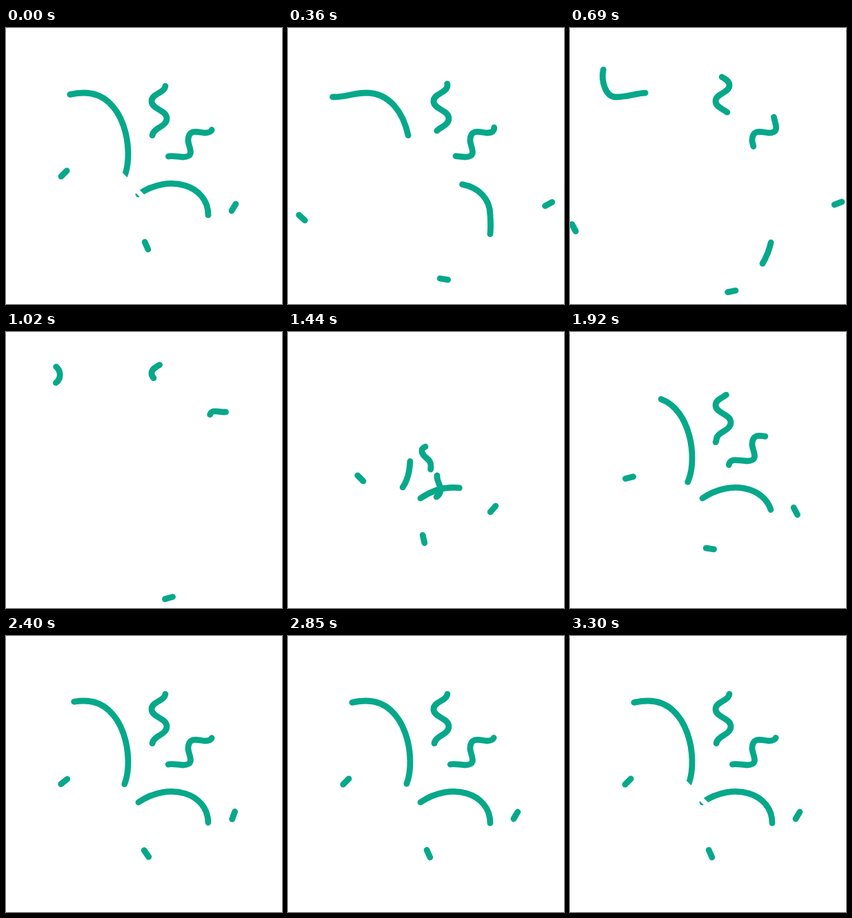
An HTML page with a canvas that plays this animation: 400x400 px, repeating every 5330 ms.

```html
<!DOCTYPE html>
<html lang="en">
<head>
<meta charset="utf-8">
<title>Confetti</title>
<style>
html, body { margin: 0; width: 100%; height: 100%; overflow: hidden; background: #fff; }
canvas { display: block; width: 400px; height: 400px; }
</style>
</head>
<body>
<canvas id="stage" width="400" height="400"></canvas>
<script>
const ctx = document.getElementById('stage').getContext('2d');
const LOOP = 5330, STEP = 30, BURST = 1110, CUT = 3270;

const clamp = v => Math.min(1, Math.max(0, v));
const mix = (a, b, u) => a + (b - a) * u;
const easeIn = (t, dur, pow) => clamp(t / dur) ** pow;
const easeOut = (t, dur, pow) => 1 - (1 - clamp(t / dur)) ** pow;

// Wavy path climbing through turning points [x, y] with upright tangents
function weave(turns) {
  return turns.slice(1).map(([x, y], i) => {
    const [px, py] = turns[i], mid = (py + y) / 2;
    return `C${px} ${mid} ${x} ${mid} ${x} ${y}`;
  }).join('');
}

// A ribbon slides along the path d and rests between two points on it.
// enter: start, duration, power; leave: duration, power
function ribbon(d, restTail, restHead, enter, leave) {
  const path = document.createElementNS('http://www.w3.org/2000/svg', 'path');
  path.setAttribute('d', d);
  const len = path.getTotalLength();
  const nearest = ([x, y]) => {
    let best = 0, min = Infinity;
    for (let s = 0; s <= len; s += 0.5) {
      const p = path.getPointAtLength(s), gap = Math.hypot(p.x - x, p.y - y);
      if (gap < min) { min = gap; best = s; }
    }
    return best;
  };
  return { shape: new Path2D(d), len, tail: nearest(restTail), head: nearest(restHead), enter, leave };
}

const ribbons = [
  ribbon('M164 228Q169 222 172 214C186 178 172 94 113 94C95 94 85 100 66 100' +
    'C44 100 40 46 62 46C76 46 86 66 70 75Q60 81 50 82',
    [172, 214], [93, 97], [1325, 1915, 4.2], [1140, 1.5]),
  ribbon('M192 241C237 210 293 228 293 271C296 310 288 332 265 362',
    [192, 241], [293, 271], [1200, 1680, 4], [840, 1.5]),
  ribbon('M186 229C202 222 207 208 207 193' + weave([[207, 193], [194, 172], [212, 157],
    [233, 131], [211, 106], [231, 83], [211, 60], [233, 36]]),
    [213, 156], [231, 85], [1304, 1136, 4], [1140, 2.65]),
  ribbon('M184 232C190 244 221 247 221 228C221 222 216 217 216 209C216 199 230 206 230 196' +
    'C230 180 245 187 256 187C276 187 264 172 264 163C264 144 281 152 288 152' +
    'C307 152 295 136 295 125C295 110 306 116 316 116S330 114 332 108',
    [235, 187], [297, 148], [1305, 1345, 4], [1140, 2.65])
];

// Chips: launch point, rest pose, exit shift and turn, exit duration, entry spin
const chips = [
  { from: [182, 216], rest: [84, 211], deg: -45, shift: [-79, 79], turn: 108, dur: 850, spin: -154 },
  { from: [176, 244], rest: [330, 260], deg: 121, shift: [59, -6], turn: 38, dur: 850, spin: 292 },
  { from: [171, 243], rest: [203.5, 315.5], deg: 66, shift: [32.5, 70], turn: -82, dur: 1110, spin: 290 }
];

function drawRibbon(r, t) {
  let tail, head;
  if (t < BURST) {
    const [dur, pow] = r.leave, u = easeIn(t, dur, pow);
    tail = mix(r.tail, r.len, u);
    head = mix(r.head, r.len, u);
  } else {
    const [start, dur, pow] = r.enter, u = easeOut(t - start, dur, pow);
    tail = r.tail * u;
    head = r.head * u;
  }
  if (head <= tail) return;
  ctx.setLineDash([head - tail, 9999]);
  ctx.lineDashOffset = -tail;
  ctx.stroke(r.shape);
  ctx.setLineDash([]);
}

function line(x1, y1, x2, y2) {
  ctx.beginPath();
  ctx.moveTo(x1, y1);
  ctx.lineTo(x2, y2);
  ctx.stroke();
}

function drawChip(c, t) {
  let pos, deg;
  if (t < BURST) {
    if (t > c.dur + 50) return;
    const u = easeOut(t, c.dur, 3);
    pos = c.rest.map((v, k) => v + c.shift[k] * u);
    deg = c.deg + c.turn * u;
  } else {
    const s = t - BURST - 15;
    if (s <= 0) return;
    const u = 1 - Math.exp(-0.0049 * s);
    pos = c.rest.map((v, k) => mix(c.from[k], v, u));
    deg = c.deg - c.spin * (1 - easeOut(s, 1915, 3));
  }
  const rad = deg * Math.PI / 180;
  const dx = 5.8 * Math.cos(rad), dy = 5.8 * Math.sin(rad), [x, y] = pos;
  line(x - dx, y - dy, x + dx, y + dy);
}

function draw(now) {
  const t = Math.floor((now % LOOP) / STEP) * STEP;
  ctx.fillStyle = '#fff';
  ctx.fillRect(0, 0, 400, 400);
  ctx.lineCap = ctx.lineJoin = 'round';
  ctx.lineWidth = 8.8;
  ctx.strokeStyle = '#06a88a';
  ribbons.forEach(r => drawRibbon(r, t));
  chips.forEach(c => drawChip(c, t));

  // white rim of the opening
  if (t >= CUT || t < 150) {
    ctx.strokeStyle = '#fff';
    ctx.lineWidth = 7.2;
    line(164, 210, 202, 248);
  }
}

const t0 = performance.now();
function tick() {
  draw(performance.now() - t0);
  requestAnimationFrame(tick);
}
tick();
</script>
</body>
</html>
```
